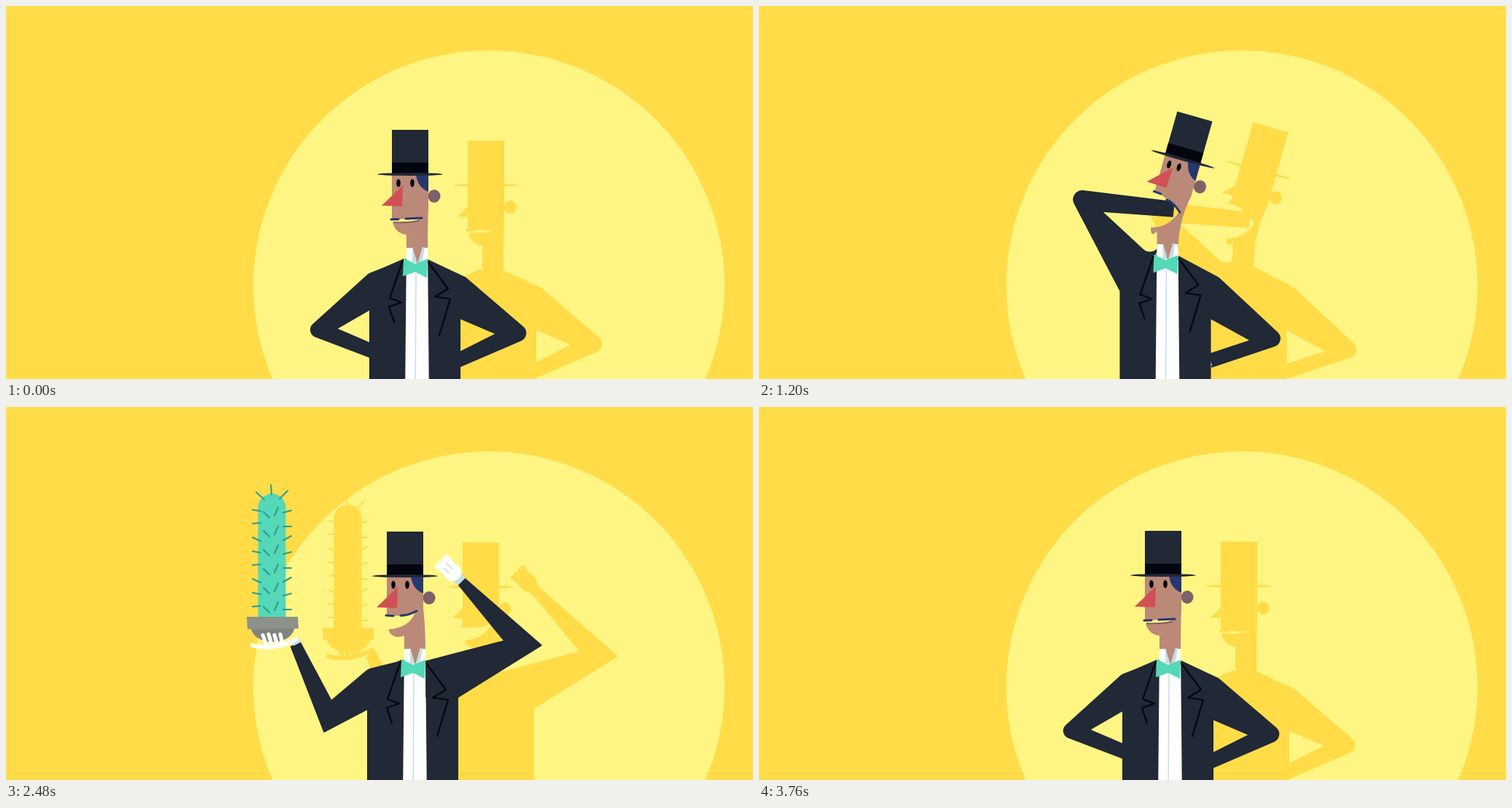
These frames come from a looping animation (1024x512 px, 3.84 s). An HTML page with a canvas:

```html
<!DOCTYPE html>
<html lang="en">
<head>
<meta charset="utf-8">
<title>Magician and cactus</title>
<style>
html, body { margin: 0; width: 100%; height: 100%; overflow: hidden; background: #ffdc48; }
canvas { display: block; }
</style>
</head>
<body>
<canvas id="stage" width="1024" height="512"></canvas>
<script>
const LOOP = 3840, STEP = 80;
const BACK = '#ffdc48', SPOT = '#fff583', SUIT = '#212836', INK = '#04060f', SKIN = '#bb8977',
  HAIR = '#27386f', NOSE = '#d05055', EAR = '#7d6069', MINT = '#54d8b7', SPIKE = '#2a9c8c', CUFF = '#c4dfe2';

const stage = document.getElementById('stage').getContext('2d');
const layer = newCanvas(), tint = newCanvas();
const g = layer.getContext('2d'), s = tint.getContext('2d');

function newCanvas() {
  return Object.assign(document.createElement('canvas'), { width: 1024, height: 512 });
}
const rad = deg => deg * Math.PI / 180;
const mix = (a, b, u) => a.map((v, i) => v + (b[i] - v) * u);

// Value at time t from a list of [time, values] keys, eased between them
function track(t, keys) {
  const i = keys.findIndex(k => k[0] > t);
  if (i < 0) return keys[keys.length - 1][1];
  const [t0, a] = keys[i - 1], [t1, b] = keys[i];
  const u = (t - t0) / (t1 - t0);
  return mix(a, b, u * u * (3 - 2 * u));
}

// Arm pose: shoulder, upper elbow corner, lower elbow corner, wrist,
// wrist half-width, armpit y, elbow radius (below zero: on the lower corner)
const move = (p, from, to, dx, dy) => p.map((v, i) => i < from || i >= to ? v : v + (i % 2 ? dy : dx));
const bend = (p, dx, dy) => move(p, 2, 6, dx, dy);
const reach = (p, dx, dy) => move(p, 6, 8, dx, dy);

const L = {
  rest: [497, 368, 409, 448, 453, 443, 505, 475, 9, 417, 10],
  hang: [497, 366, 415, 430, 440, 450, 385, 495, 8, 415, 3],
  out: [500, 356, 412, 335, 395, 362, 325, 278, 8, 400, 0],
  mouth: [540, 347, 470, 282, 422, 251, 568, 279, 10, 390, -12],
  pull: [525, 341, 418, 273, 357, 249, 444, 259, 9, 393, -12],
  show: [505, 350, 417, 375, 395, 411, 393, 300, 7, 394, 0],
  hold: [497, 360, 446, 403, 436, 446, 397, 326, 7, 415, 0],
  dip: [500, 335, 450, 321, 440, 362, 392, 320, 17, 388, 0]
};
L.settle = mix(L.show, L.hold, .35);
L.drop = reach(bend(L.dip, 0, 18), 3, 40);

const R = {
  rest: [630, 373, 722, 452, 672, 450, 618, 487, 9, 429, 11],
  swing: [625, 362, 694, 384, 722, 402, 715, 330, 7, 415, 0],
  grip: [610, 340, 683, 321, 734, 327, 624, 239, 6, 398, 0],
  fold: [636, 362, 680, 450, 650, 415, 580, 410, 8, 425, 0],
  dip: [638, 367, 622, 516, 579, 472, 518, 437, 9, 430, 0]
};
R.low = bend(R.rest, 2, 9);
R.show = bend(R.rest, 5, -6);
R.tip = reach(bend(R.grip, 6, 0), 88, 23);
R.lift = reach(R.grip, 4, -34);

const left = [[0, L.rest], [80, L.rest], [240, L.hang], [440, L.out], [600, L.out], [800, L.mouth],
  [1200, L.mouth], [1520, L.pull], [1680, L.pull], [1920, L.show], [2000, L.show], [2160, L.settle],
  [2240, L.settle], [2480, L.hold], [2640, L.hold], [2800, L.settle], [2960, L.dip], [3120, L.drop],
  [3200, L.drop], [3440, L.out], [3600, L.hang], [3760, L.rest]];
const right = [[0, R.rest], [600, R.rest], [880, R.low], [1680, R.low], [2000, R.show], [2240, R.show],
  [2360, R.swing], [2480, R.grip], [2560, R.grip], [2800, R.tip], [2880, R.fold], [2960, R.dip],
  [3200, R.dip], [3320, R.fold], [3440, R.lift], [3520, R.grip], [3640, R.swing], [3760, R.rest]];

// Mouth: jaw drop, left y, right y, sag
const CALM = [0, 62, 60, 0], SMIRK = [2, 58, 53, 5], GAG = [35, 53, 70, -6], GULP = [44, 55, 82, -4],
  BEAM = [19, 63, 49, 8], SMILE = [7, 54, 48, 6];
const mouths = [[0, CALM], [80, CALM], [400, SMIRK], [600, SMIRK], [800, GAG], [1120, GAG], [1520, GULP],
  [1680, GULP], [1840, BEAM], [2000, BEAM], [2480, SMILE], [2800, SMILE], [2960, SMIRK], [3440, SMIRK], [3680, CALM]];

// Head: x, y, turn
const HOME = [554, 231, 0], SUNK = [564, 243, 7];
const heads = [[0, HOME], [80, HOME], [600, [551, 234, -2]], [880, [582, 212, 16]], [1120, [580, 210, 14]],
  [1520, [588, 213, 31]], [1680, [590, 214, 33]], [2000, [560, 223.5, 7]], [2240, [556, 228, 4]],
  [2480, [547, 232, 0]], [2800, [556, 236, -2]], [2960, [565, 238, 7]], [3120, SUNK], [3200, SUNK], [3680, HOME]];
const bodies = [[0, [0, 0]], [600, [0, 0]], [880, [-3, -2]], [1520, [-4, -8]], [1680, [-4, -8]],
  [2000, [-2.5, -5]], [2480, [-3, 0]], [2800, [-3, 0]], [2960, [-1, -3]], [3120, [-1, 0]], [3200, [-1, 0]], [3680, [0, 0]]];

// Hat off the head: x, y, turn, openness of the brim
const DOWN = [432, 406, 180, 1];
const hats = [[0, [547, 232, 0, 0]], [2520, [547, 232, 0, 0]], [2640, [590, 185, 12, 0]], [2800, [698, 218, 45, 0]],
  [2960, DOWN], [3200, DOWN], [3440, [565, 182, 8, 0]], [3520, [554, 232, 0, 0]]];

// Pot rim: x, y, turn
const REST = [368, 270, 7], UP = [365, 288, 0];
const pots = [[0, [575, 285, 119]], [1200, [575, 285, 119]], [1520, [499, 251, 119]], [1680, [478, 240, 115]],
  [1920, [374, 244, 23]], [2000, [378, 248, 20]], [2160, REST], [2240, REST], [2480, UP], [2640, UP],
  [2800, [360, 276, -5]], [2880, [400, 282, 100]], [2960, [431, 363, 180]], [3120, [431, 440, 180]]];

function poly(color, ...p) {
  g.fillStyle = color;
  g.beginPath();
  for (let i = 0; i < p.length; i += 2) g.lineTo(p[i], p[i + 1]);
  g.fill();
}
function line(color, width, ...p) {
  g.strokeStyle = color;
  g.lineWidth = width;
  g.beginPath();
  for (let i = 0; i < p.length; i += 2) g.lineTo(p[i], p[i + 1]);
  g.stroke();
}
function curve(color, width, x0, y0, cx, cy, x1, y1) {
  g.strokeStyle = color;
  g.lineWidth = width;
  g.beginPath();
  g.moveTo(x0, y0);
  g.quadraticCurveTo(cx, cy, x1, y1);
  g.stroke();
}
function oval(color, x, y, rx, ry) {
  g.fillStyle = color;
  g.beginPath();
  g.ellipse(x, y, rx, ry, 0, 0, 7);
  g.fill();
}
function at(x, y, turn, draw) {
  g.save();
  g.translate(x, y);
  g.rotate(turn);
  draw();
  g.restore();
}

function forearm([, , ax, ay, cx, cy, wx, wy]) {
  return [wx - (ax + cx) / 2, wy - (ay + cy) / 2];
}
function hand(p, spread) {
  const [dx, dy] = forearm(p);
  at(p[6], p[7], Math.atan2(dy, dx), () => glove(spread));
}
function arm(p, side, [bx, by]) {
  const [sx, sy, ax, ay, cx, cy, wx, wy, hw, ly, r] = p;
  const [dx, dy] = forearm(p), n = side * hw / (Math.hypot(dx, dy) || 1);
  const nx = -dy * n, ny = dx * n;
  const neck = (side > 0 ? 545 : 579) + bx, pit = (side > 0 ? 498 : 623) + bx;
  g.fillStyle = g.strokeStyle = SUIT;
  g.lineWidth = 1.5;
  g.beginPath();
  g.moveTo(neck, 349 + by);
  g.arcTo(sx, sy, ax, ay, 14);
  g.arcTo(ax, ay, wx + nx, wy + ny, Math.max(0, r));
  g.lineTo(wx + nx, wy + ny);
  g.lineTo(wx - nx, wy - ny);
  g.arcTo(cx, cy, pit, ly, Math.max(0, -r));
  g.lineTo(pit, ly);
  g.lineTo(neck, ly);
  g.closePath();
  g.fill();
  g.stroke();
  if (hw > 10) oval(SUIT, wx, wy, hw, hw);
}

function glove(spread) {
  poly(CUFF, -1, -7, 7, -8, 7, 8, -1, 7);
  oval('#fff', 18, 0, 13, 12);
  for (let i = -1.5; i < 2; i++) {
    const c = Math.cos(i * spread), d = Math.sin(i * spread);
    line('#fff', 6, 18 + 6 * c, i * 5, 18 + 20 * c, i * 4 + 20 * d);
  }
  line(CUFF, 1.5, 20, -4, 30, -5);
  line(CUFF, 1.5, 20, 3, 31, 3);
}

function cactus([x, y, turn], t, floor) {
  const len = t < 1720 ? (t - 1200) / 4 : 190, k = Math.min(1, (t - 1200) / 240);
  g.save();
  g.beginPath();
  g.rect(0, 0, 1024, floor);
  g.clip();
  at(x, y, rad(turn), () => {
    g.scale(k, k);
    g.save();
    g.beginPath();
    g.rect(-60, -len, 120, len + 2);
    g.clip();
    g.fillStyle = MINT;
    g.beginPath();
    g.roundRect(-19.5, -169, 38, 180, [19, 19, 0, 0]);
    g.fill();
    for (let i = 0; i < 9; i++) {
      const h = -12 - i * 19, j = i % 3 * 3 - 2, in_ = i > 7 ? 5 : 0;
      line(SPIKE, 2, -27 + in_, h - 2 - in_, -16 + in_, h + j - 1);
      line(SPIKE, 2, 26 - in_, h - j - in_, 15 - in_, h + 2);
    }
    line(SPIKE, 2, -2, -181, -1, -168);
    for (let i = 0; i < 6; i++) {
      const h = -10 - i * 26;
      line(SPIKE, 2, -12, h - 4, -4, h + 4);
      line(SPIKE, 2, 8, h - 10, 3, h + 1);
    }
    g.restore();
    g.fillStyle = '#81847d';
    g.beginPath();
    g.moveTo(-30, 12);
    g.bezierCurveTo(-28, 42, 29, 42, 31, 12);
    g.fill();
    poly('#8d9189', -35, 0, 35, 0, 36, 16, -34, 17);
    if (t < 2840) poly(CUFF, 25, 32, 35, 27, 39, 35, 29, 40);
    curve('#fff', 6, -27, 39, -2, 47, 33, 31);
    for (let i = 0; i < 4; i++) line('#fff', 5, -13 + i * 8, 25 - i % 2, -8 + i * 7.5, 39);
  });
  g.restore();
}

function hat([x, y, turn, open]) {
  at(x, y, rad(turn), () => {
    const top = -61 + open * 10, band = -16 - open * 7;
    g.fillStyle = SUIT;
    g.beginPath();
    g.moveTo(-25, 0);
    g.lineTo(-25, top);
    g.quadraticCurveTo(0, top - open * 6, 25, top);
    g.lineTo(25, 0);
    g.fill();
    poly(INK, -25, band, 25, band, 25, 0, -25, 0);
    oval(SUIT, 0, 0, 45, 2 + open * 5);
    if (open > .5) oval(INK, 0, 2, 27, 4 * open);
  });
}

function head([x, y, turn], [drop, ml, mr, sag], [bx, by]) {
  const c = Math.cos(rad(turn)), d = Math.sin(rad(turn));
  const local = () => g.setTransform(c, d, -d, c, x, y);
  const world = () => g.setTransform(1, 0, 0, 1, 0, 0);
  const tx = -24 + drop * .2, ty = 66 + drop, my = (ml + mr) / 2 + sag;
  local();
  oval(EAR, 33, 30, 8.5, 9);
  g.fillStyle = SKIN;
  g.beginPath();
  g.moveTo(-25, ml);
  g.lineTo(-25, 0);
  g.bezierCurveTo(-25, -32, 25, -32, 25, 0);
  g.lineTo(25, 45);
  world();
  g.quadraticCurveTo(578 + bx, 300 + by, 578 + bx, 342 + by);
  g.lineTo(549 + bx, 342 + by);
  g.lineTo(549 + bx, 314 + by);
  local();
  g.quadraticCurveTo(tx + 4, ty + 15, tx, ty);
  g.quadraticCurveTo(6, ty - drop * .15, 15, mr);
  g.quadraticCurveTo(-2, my, -25, ml);
  g.fill();

  g.fillStyle = HAIR;
  g.beginPath();
  g.moveTo(25, 24);
  g.quadraticCurveTo(10, 18, 8, 0);
  g.quadraticCurveTo(8, -14, 12, -21.5);
  g.quadraticCurveTo(25, -15, 25, 0);
  g.fill();
  const gap = 19 - Math.min(5, Math.abs(turn) * .6);
  oval(INK, -16, 12, 2.8, 5.5);
  oval(INK, -16 + gap, 12, 2.8, 5.5);
  poly(NOSE, -39, 43, -10, 15, -11, 44);
  if (drop < 4) curve('#80625f', 2, -22, ml + 4, -3, my + 6, 12, mr + 4);
  curve(HAIR, 3, -6, my * .55 + ml * .2 + mr * .25, 4, my - sag * .3 + (mr - ml) * .12, 16, mr);
  line(HAIR, 3, -26, ml, -16, ml * .75 + my * .25);
  world();
}

function torso() {
  poly(SUIT, 545, 347, 520, 358, 498, 395, 498, 540, 623, 540, 623, 395, 604, 364, 578, 349);
  poly('#fff', 549, 332, 578, 332, 580, 540, 547, 540);
  line(CUFF, 1.5, 562, 366, 561, 540);
  poly(CUFF, 557, 331, 574, 331, 570, 354, 557, 352);
  poly(SKIN, 557, 330, 571, 330, 564, 354);
}
function trim() {
  poly(MINT, 545, 346, 561, 354, 578, 347, 577, 373, 561, 365, 544, 371);
  line(INK, 2.2, 544, 349, 526, 401, 542, 407, 525, 413, 532, 434);
  line(INK, 2.2, 579, 352, 606, 388, 588, 399, 609, 402, 594, 452);
}

function figure(t) {
  const face = track(t, heads), body = track(t, bodies), pot = track(t, pots);
  const la = track(t, left), ra = track(t, right);
  const worn = t < 2520 || t >= 3520, cap = worn ? [...face, 0] : track(t, hats);
  const held = t > 1240 && t < 3240, front = t > 2380 && t < 3600;
  g.clearRect(0, 0, 1024, 512);
  g.lineCap = g.lineJoin = 'round';
  arm(la, 1, body);
  if (t < 800 || t > 3200) hand(la, .3);
  if (!front) {
    arm(ra, -1, body);
    hand(ra, .12);
  }
  if (held && t < 1720) cactus(pot, t, 512);
  head(face, track(t, mouths), body);
  at(...body, 0, torso);
  if (front) arm(ra, -1, body);
  at(...body, 0, trim);
  hat(cap);
  if (held && t >= 1720) cactus(pot, t, t > 2920 ? cap[1] + 4 : 512);
  if (front) hand(ra, .12);
}

function draw(now) {
  figure(Math.floor(now % LOOP / STEP) * STEP);
  // the shadow is the figure's outline in the wall colour
  s.globalCompositeOperation = 'copy';
  s.drawImage(layer, 0, 0);
  s.globalCompositeOperation = 'source-in';
  s.fillStyle = BACK;
  s.fillRect(0, 0, 1024, 512);

  stage.fillStyle = BACK;
  stage.fillRect(0, 0, 1024, 512);
  stage.fillStyle = SPOT;
  stage.beginPath();
  stage.arc(662, 384, 323, 0, 7);
  stage.fill();
  stage.drawImage(tint, 104, 15);
  stage.drawImage(layer, 0, 0);
}

const start = performance.now();
function tick() {
  draw(performance.now() - start);
  requestAnimationFrame(tick);
}
tick();
</script>
</body>
</html>
```
